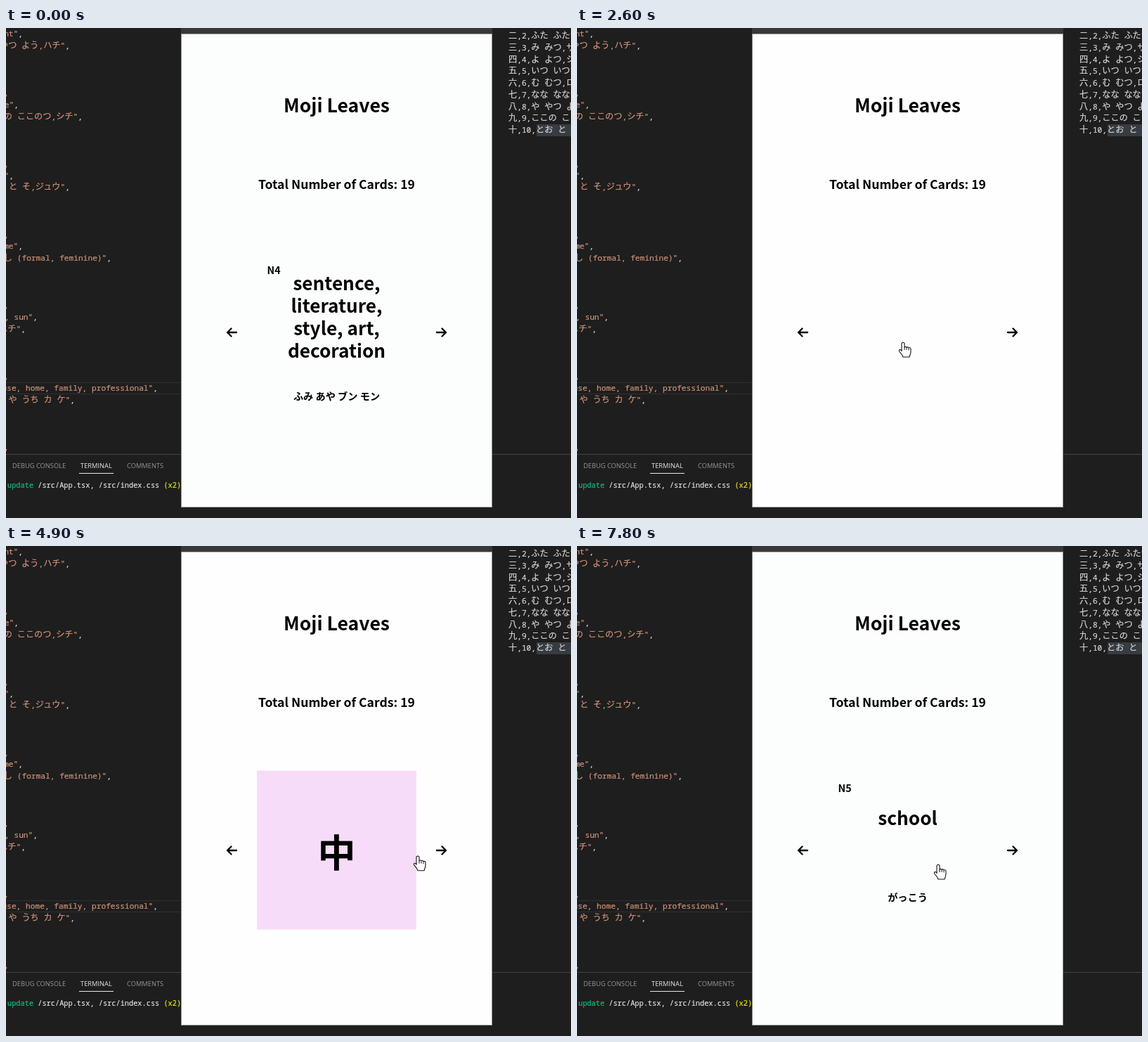
An HTML page for the animation above (8000 ms loop, 804x697 px).

```html
<!DOCTYPE html>
<html lang="en">
<head>
<meta charset="utf-8">
<style>
  html, body { margin: 0; width: 100%; height: 100%; overflow: hidden; background: #1e1e1e; }
  svg { display: block; }
  text { white-space: pre; }
  .code { font: 11.2px "Noto Sans Mono", "DejaVu Sans Mono", monospace; fill: #d4d4d4; stroke: #d4d4d4; stroke-width: .2; }
  .jp { font-family: "Noto Sans CJK JP", "Noto Sans CJK", sans-serif; font-size: 12.2px; }
  .str { fill: #ce9178; stroke: #ce9178; }
  .tab { font: 9.3px "Open Sans", "Noto Sans", sans-serif; fill: #969696; }
  .term { font-size: 10.3px; fill: #e5e5e5; }
  .page { font-family: "Noto Sans CJK JP", "Noto Sans CJK", sans-serif; font-weight: 700; text-anchor: middle; }
  .small { font-size: 14.2px; }
  .arrow { fill: none; stroke: #000; stroke-width: 2.3; stroke-linecap: round; stroke-linejoin: round; }
</style>
</head>
<body>
<svg width="804" height="697" viewBox="0 0 804 697">
  <path d="M0 504.5H249M0 520.5H249" stroke="#303030"/>
  <path d="M0 606.5H804" stroke="#444"/>
  <rect x="755" y="137" width="49" height="17" fill="#373c42"/>
  <g id="code" class="code"></g>
  <text class="tab" x="9" y="626">DEBUG CONSOLE</text>
  <text class="tab" x="106" y="626" style="fill:#e7e7e7">TERMINAL</text>
  <text class="tab" x="172" y="626">COMMENTS</text>
  <path d="M104 633.5H153" stroke="#e7e7e7"/>
  <text class="code term" x="2" y="654"><tspan fill="#0dbc79" stroke="#0dbc79">update</tspan> /src/App.tsx, /src/index.css <tspan fill="#e5e510" stroke="#e5e510">(x2)</tspan></text>

  <rect x="249" width="443" height="8" fill="#383838"/>
  <rect id="sheet" x="249.5" y="8.500" width="442" height="673" stroke="#999"/>
  <g class="page">
    <text x="470.5" y="119.5" font-size="26.6">Moji Leaves</text>
    <text x="470.5" y="229" font-size="17.6">Total Number of Cards: 19</text>
    <g id="front">
      <rect x="-113.5" y="319.5" width="227" height="226" fill="#f7dcf9"/>
      <text id="kanji" y="456.5" font-size="54"></text>
    </g>
    <g id="back"></g>
  </g>
  <path class="arrow" d="M328 433H315M320.500 427.500L315 433L320.500 438.500M613 433H626M620.500 427.500L626 433L620.500 438.500"/>
  <g id="cursor">
    <circle id="press" r="10.5" fill="#f9e36b" opacity=".9"/>
    <path d="M-2 1.500Q0-1 2 1.500V7Q4 5.500 5 7.500Q7 6 8 8Q10.500 7 11 9.500V14Q10.500 17 9 21H0Q-1 18-5 13.500Q-6.500 10.500-4 10.500Q-3 10.500-2 12.500Z" fill="#fff" stroke="#111" stroke-width="1.1" stroke-linejoin="round"/>
    <path d="M2 7V11M5 8V11M8 8.500V11.500" stroke="#111"/>
  </g>
</svg>
<script>
const $ = id => document.getElementById(id);
const wrapJapanese = s => s.replace(/[^\x00-\x7f]+/g, '<tspan class="jp">$&</tspan>');

// Editor strings: [line, right edge, text]; the left part is cut by the stage
const strings = [
  [0, 24, 'nt"'], [1, 91, 'や やつ よう,ハチ"'], [6, 18, 'ne"'],
  [7, 109, 'ここの ここのつ,シチ"'], [12, 11, 'n"'], [13, 91, 'とお と そ,ジュウ"'],
  [18, 24, 'me"'], [19, 150, 'わたし (formal, feminine)"'], [24, 45, 'day, sun"'],
  [25, 28, 'ニチ"'], [30, 216, 'house, home, family, professional"'], [31, 98, 'いえ や うち カ ケ"']
];
const list = ['二,2,ふた ふたつ', '三,3,み みつ,サン', '四,4,よ よつ,シ', '五,5,いつ いつつ', '六,6,む むつ,ロク',
  '七,7,なな ななつ', '八,8,や やつ よう', '九,9,ここの ここのつ', '十,10,とお と そ'];
$('code').innerHTML =
  strings.map(([line, x, s]) => `<text x="${x}" y="${12 + line * 16.8}" text-anchor="end"><tspan class="str">${wrapJapanese(s)}</tspan>,</text>`).join('') +
  [5, 11, 17, 23, 29, 35].map(line => `<text class="str" x="-3" y="${12 + line * 16.8}">,</text>`).join('') +
  list.map((s, i) => `<text x="715" y="${15 + i * 16.75}">${wrapJapanese(s)}</text>`).join('');

const cards = [
  ['文', 'N4', 'sentence,|literature,|style, art,|decoration', 'ふみ あや ブン モン'],
  ['国', 'N5', 'country', 'くに コク'],
  ['州', 'N2', 'state; province', 'す シュウ'],
  ['中', 'N5', 'in, inside,|middle, mean,|center', 'なか うち あたる チュウ'],
  ['学校', 'N5', 'school', 'がっこう']
];

// Even entries turn to the front, odd ones to the back
const flips = [350, 1060, 1800, 2450, 3150, 3752, 4500, 5290, 6450, 7150];
const FLIP = 400;
const path = [
  [100, 697, 596], [350, 455, 474], [1300, 455, 474], [1550, 617, 426], [1900, 617, 426],
  [2300, 464, 447], [2800, 464, 447], [3050, 622, 428], [3300, 622, 428], [3650, 508, 451],
  [4200, 508, 451], [4450, 626, 432], [4750, 626, 432], [5150, 520, 455], [5400, 520, 455],
  [5700, 596, 449], [6300, 608, 433], [6600, 608, 433], [6950, 514, 453], [8000, 514, 453]
];
const clamp = v => Math.max(0, Math.min(1, v));

let shown = -1;
function showCard(index) {
  if (index === shown) return;
  shown = index;
  const [kanji, level, meaning, reading] = cards[index];
  const lines = meaning.split('|'), n = lines.length;
  $('kanji').textContent = kanji;
  $('back').innerHTML = `<text class="small" x="-89.500" y="350">${level}</text>` +
    lines.map((s, i) => `<text y="${404.5 - 8 * n + 32 * i}" font-size="26.2">${s}</text>`).join('') +
    `<text class="small" y="${497 + 8 * n}">${reading}</text>`;
}

function pose(id, angle, opacity) {
  $(id).setAttribute('transform', `translate(470.5 0) scale(${Math.max(0.001, Math.cos(angle))} 1)`);
  $(id).setAttribute('opacity', opacity);
}

function draw(t) {
  const i = flips.filter(start => start <= t).length - 1;
  const p = i < 0 ? 1 : clamp((t - flips[i]) / FLIP);
  const turn = i % 2 ? p : 1 - p;   // 0 = front, 1 = back
  showCard(Math.max(0, Math.floor(i / 2) - (i > 0 && i % 2 === 0 && p < 0.5 ? 1 : 0)));
  pose('front', Math.PI * turn, clamp(1 - turn / 0.15));
  pose('back', Math.PI * (1 - turn), clamp((turn - 0.85) / 0.15));
  $('sheet').setAttribute('fill', turn === 1 ? '#fcfefd' : '#fefefe');

  const k = Math.max(1, path.findIndex(([time]) => time > t));
  const [t0, x0, y0] = path[k - 1], [t1, x1, y1] = path[k];
  const u = clamp((t - t0) / (t1 - t0));
  $('cursor').setAttribute('transform', `translate(${x0 + (x1 - x0) * u} ${y0 + (y1 - y0) * u})`);
  $('cursor').style.display = t < 100 ? 'none' : '';
  $('press').style.display = flips.some(start => t >= start - 80 && t < start + 60) ? '' : 'none';
}

// The opening pose rests on the back of the first card
const drawAt = t => draw(t % 8000);
function frame() {
  drawAt(performance.now());
  requestAnimationFrame(frame);
}
frame();
</script>
</body>
</html>
```
